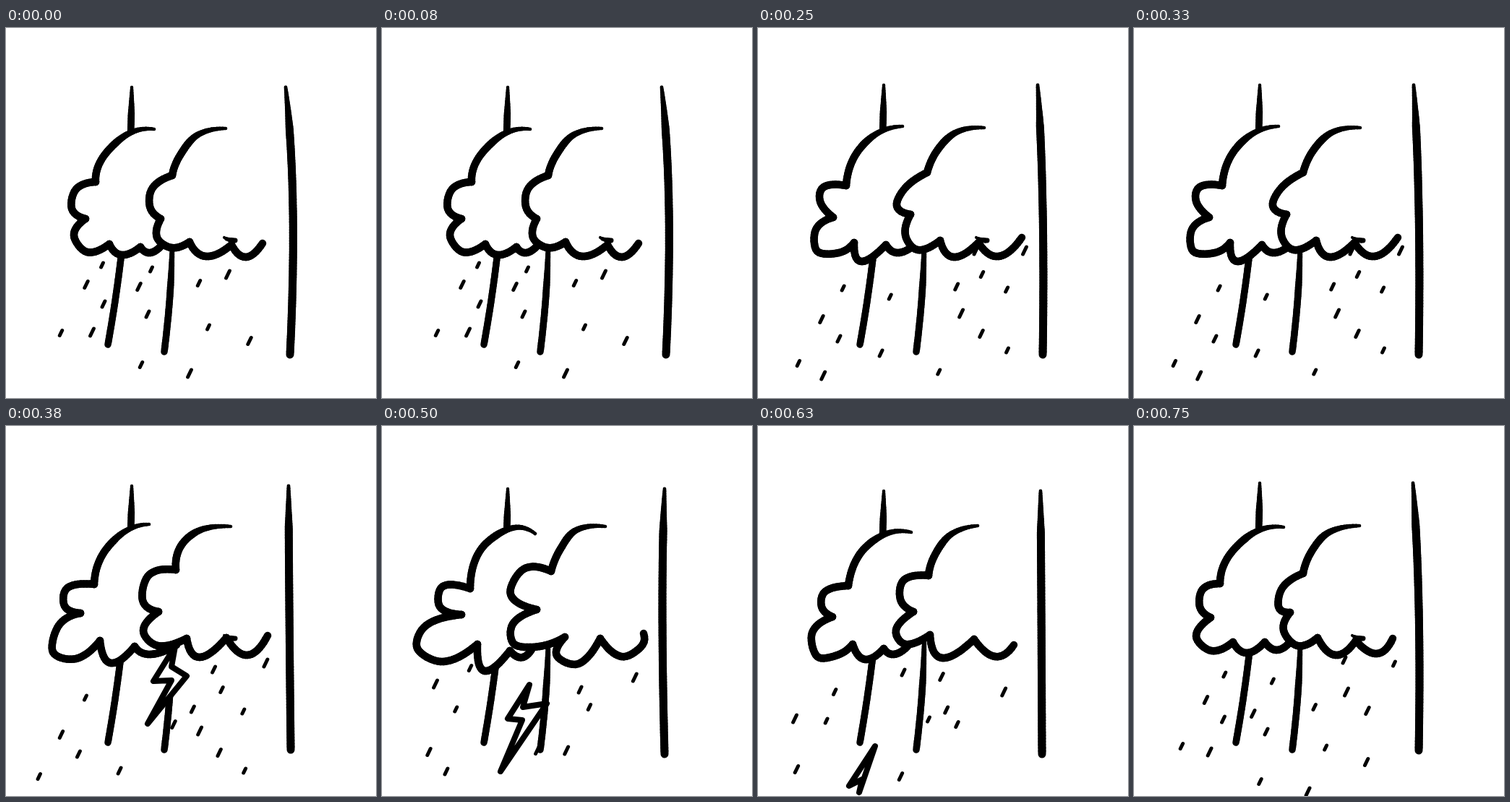
Animation, 512 px wide and 512 px high, one loop 870 ms. Source, as an HTML page:

```html
<!DOCTYPE html>
<html lang="en">
<head>
<meta charset="utf-8">
<title>Storm clouds</title>
<style>
html, body { margin: 0; width: 100%; height: 100%; overflow: hidden; background: #fff; }
svg { display: block; width: 100vw; height: 100vh; }
</style>
</head>
<body>
<svg id="stage" viewBox="0 0 512 512" fill="none" stroke="#000" stroke-linecap="round" stroke-linejoin="round"></svg>
<script>
// Clouds are key points; "|" marks the cusp between two lobes.
// The pole is the right one: tip, middle, foot. The bolt is a closed outline.
const poses = [
  {
    pole: '387,82 397,250 393,452',
    back: '205,140 168,147 134,179 124,213 | 97,223 91,250 110,264 | 94,287 112,310 143,299 | 160,314 186,303 | 200,311 218,298',
    front: '304,139 265,148 241,176 230,204 | 203,221 199,247 214,264 | 209,290 229,304 254,296 | 277,316 312,300 | 332,317 355,298'
  },
  {
    pole: '386,79 394,250 394,449',
    back: '207,140 167,147 131,180 119,218 | 95,226 91,250 106,265 | 86,291 107,311 137,299 | 156,314 181,299 | 197,310 215,300',
    front: '312,138 270,147 246,173 234,204 | 206,223 200,250 216,258 | 207,283 226,304 254,293 | 279,317 307,297 | 336,315 358,294'
  },
  {
    pole: '387,79 394,250 394,452',
    back: '200,136 163,147 134,177 122,218 | 91,220 86,240 104,262 | 80,279 82,309 112,311 133,297 | 143,323 177,300 | 192,311 213,303',
    front: '313,138 275,144 249,168 234,200 | 204,221 192,246 211,258 | 204,287 221,307 252,294 | 271,317 305,297 | 333,316 365,290'
  },
  {
    pole: '391,83 392,250 394,448',
    back: '198,136 163,147 133,179 122,219 | 85,224 81,249 103,259 | 73,276 65,313 97,322 130,297 | 145,328 178,305 | 200,316 236,303',
    front: '311,139 269,144 242,166 235,199 | 198,206 189,241 211,257 | 190,283 210,304 250,294 | 268,320 305,293 | 334,317 362,290',
    bolt: '234,305 204,353 229,352 196,412 250,346 229,333'
  },
  {
    pole: '391,87 388,250 391,454',
    back: '212,149 177,142 136,172 122,225 | 84,222 80,250 110,261 | 61,276 49,308 85,326 132,302 | 142,339 177,311 | 195,320 211,302',
    front: '309,139 269,144 247,170 234,201 | 196,198 178,233 214,254 | 181,274 183,302 218,305 253,292 | 242,318 272,329 302,294 | 331,319 358,306 362,287',
    bolt: '204,358 174,405 194,407 164,478 228,384 195,389'
  },
  {
    pole: '391,90 392,250 393,454',
    back: '212,147 175,150 141,177 125,221 | 93,229 88,250 103,264 | 75,286 82,319 110,317 131,302 | 148,323 174,308 | 188,316 207,305',
    front: '304,138 267,150 245,178 236,207 | 202,213 197,240 215,257 | 191,282 204,302 238,289 | 255,321 299,295 | 328,319 354,303',
    bolt: '162,443 126,498 144,489 140,507'
  }
];

// Falling drops: x, y, first pose, last pose, fall per pose.
const rain = `133,328,0,5,16 111,355,0,5,24 76,422,0,3,21 119,421,0,2,30 135,382,0,4,24
  201,334,0,2,19 184,358,0,1,40 267,353,0,1,36 307,341,0,4,27 196,396,0,3,27 280,414,0,2,31
  337,433,0,1,32 187,466,0,1,26 254,478,0,1,28 291,324,1,3,34 360,329,1,3,33 323,394,1,3,29
  310,341,2,5,24 369,308,2,5,20 301,309,2,5,28 345,446,2,3,31 232,413,3,5,36 122,335,4,5,33
  74,357,4,5,48 201,341,5,5,0 236,406,5,5,0 254,347,5,5,0`.split(/\s+/);

// [pose, duration in ms]
const timeline = [[0, 130], [1, 120], [2, 130], [3, 120], [4, 130], [5, 120], [1, 120]];
const loop = timeline.reduce((sum, step) => sum + step[1], 0);

const stage = document.getElementById('stage');
const add = (parent, tag, attrs) => {
  const el = document.createElementNS('http://www.w3.org/2000/svg', tag);
  for (const key in attrs) el.setAttribute(key, attrs[key]);
  return parent.appendChild(el);
};
const parse = text => text.trim().split(' ').map(p => p.split(',').map(Number));
const pathOf = pts => 'M' + pts.map(p => p.map(v => v.toFixed(1)).join(' ')).join('L');
const dist = (p, q) => Math.hypot(q[0] - p[0], q[1] - p[1]);

// Smooth curve through the points of one lobe, with round ends.
function spline(pts) {
  const lead = (a, b, c) => a.map((v, k) => 3 * v - 3 * b[k] + c[k]);
  const n = pts.length;
  const all = [lead(pts[0], pts[1], pts[2]), ...pts, lead(pts[n - 1], pts[n - 2], pts[n - 3])];
  const out = [pts[0]];
  for (let i = 1; i < n; i++) {
    const [a, b, c, d] = all.slice(i - 1, i + 3);
    const steps = Math.ceil(dist(b, c) / 4);
    for (let s = 1; s <= steps; s++) {
      const t = s / steps;
      out.push(b.map((v, k) => v + t / 2 * (c[k] - a[k]
        + t * (2 * a[k] - 5 * v + 4 * c[k] - d[k]
        + t * (3 * (v - c[k]) + d[k] - a[k])))));
    }
  }
  return out;
}

function trace(text) {
  let out = [];
  for (const lobe of text.split('|')) {
    const start = out.slice(-1);
    out = out.concat(spline([...start, ...parse(lobe)]));
  }
  return out;
}

// Pen line that swells from a thin tip to its full width.
function ink(parent, pts, width, swell) {
  let run = 0;
  for (let i = 1; i < pts.length; i++) {
    run += dist(pts[i - 1], pts[i]);
    const w = width * (0.4 + 0.6 * Math.min(1, run / swell));
    add(parent, 'path', { d: pathOf([pts[i - 1], pts[i]]), 'stroke-width': w.toFixed(2) });
  }
}

function cloud(parent, text) {
  const pts = trace(text);
  add(parent, 'path', { d: pathOf(pts), fill: '#fff', stroke: 'none' });
  ink(parent, pts, 10.5, 60);
}

function drop(parent, text, pose, i) {
  const [x, y, first, last, fall] = text.split(',').map(Number);
  if (pose < first || pose > last) return;
  const slant = 0.48, dy = 3 + i * 3 % 5 * 0.5;
  const cy = y + fall * (pose - first), cx = x - slant * (cy - y);
  const ends = [[cx + slant * dy, cy - dy], [cx - slant * dy, cy + dy]];
  add(parent, 'path', { d: pathOf(ends), 'stroke-width': 5 });
}

function draw(pose, index) {
  const g = add(stage, 'g', { display: 'none' });
  const tip = parse(pose.pole)[0][1];
  ink(g, trace(`174,${tip} 165,262 141,438`), 9.5, 40);
  ink(g, trace('230,260 228,352 219,448'), 9.5, 100);
  ink(g, trace(pose.pole), 11, 60);
  cloud(g, pose.back);
  if (pose.bolt) {
    add(g, 'path', { d: pathOf(parse(pose.bolt)) + 'Z', fill: '#fff', 'stroke-width': 8 });
  }
  cloud(g, pose.front);
  if (index < 4) ink(g, trace('302,290 309,293 317,294'), 7, 12);
  rain.forEach((text, i) => drop(g, text, index, i));
  return g;
}

const groups = poses.map(draw);

function poseAt(ms) {
  let t = ms % loop;
  for (const [pose, hold] of timeline) {
    if (t < hold) return pose;
    t -= hold;
  }
  return 0;
}

function render(ms) {
  const pose = poseAt(ms);
  groups.forEach((g, i) => g.setAttribute('display', i === pose ? 'inline' : 'none'));
}

function tick() {
  render(performance.now());
  requestAnimationFrame(tick);
}
render(0);
requestAnimationFrame(tick);
</script>
</body>
</html>
```
